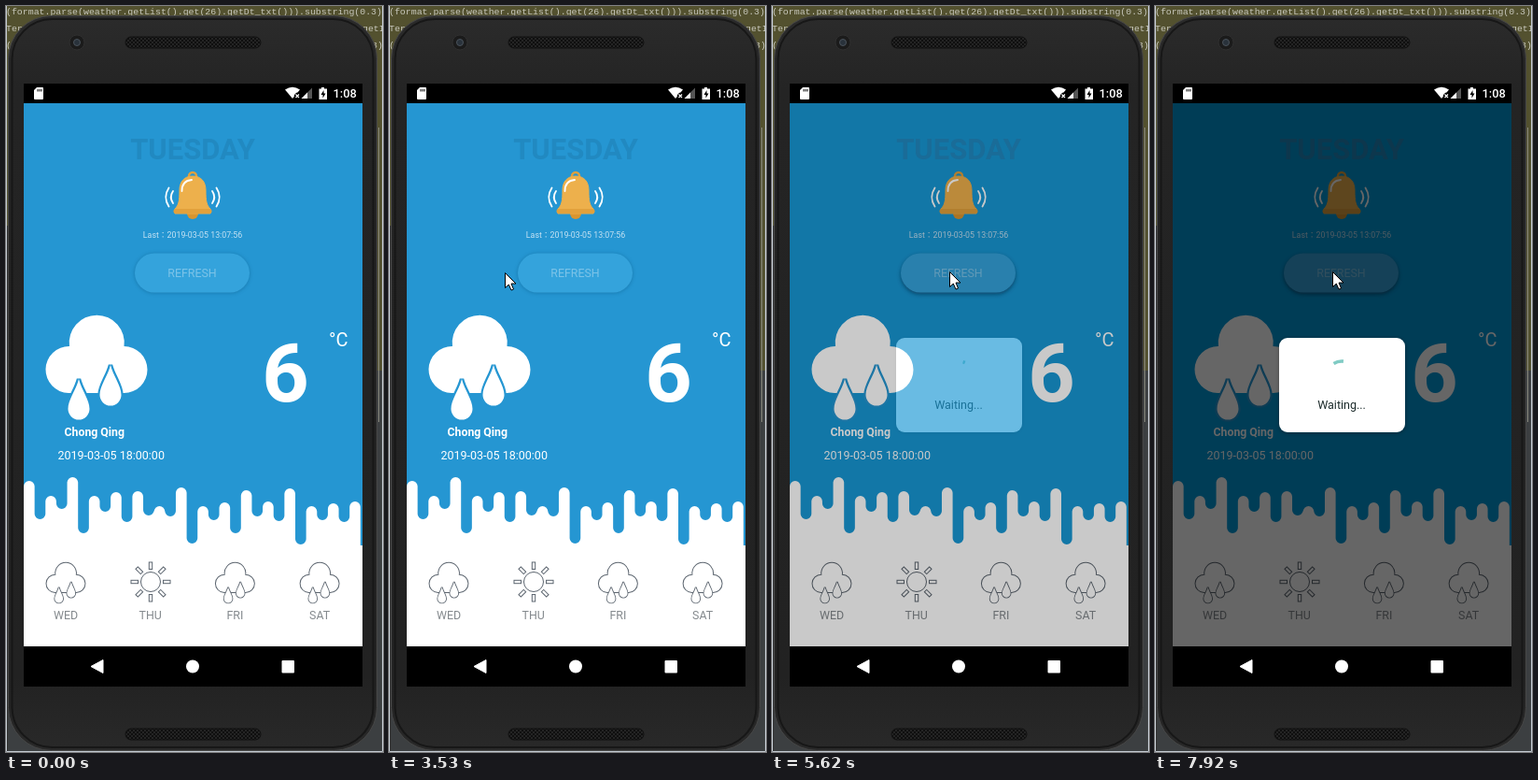
Animation of 404x798 px, one loop 8000 ms. Source, as an HTML page:

```html
<!DOCTYPE html>
<html lang="en">
<head>
<meta charset="utf-8">
<title>Weather refresh</title>
<style>
  html, body { margin: 0; width: 100%; height: 100%; overflow: hidden; background: #3c3f41; }
  svg { display: block; width: 404px; height: 798px; font-family: Roboto, sans-serif; }
  .code { font: 9.9px "Liberation Mono", monospace; fill: #c9c9bd; white-space: pre; }
  .mid { text-anchor: middle; }
  .bold { font-weight: 700; }
  .icon { fill: #fff; stroke: #5d6670; stroke-width: 2.6; --edge: #5d6670; }
  .big { fill: #fff; --edge: #2596d2; }
  .drop { stroke: var(--edge); stroke-width: 4.500; paint-order: stroke; }
</style>
</head>
<body>
<svg viewBox="0 0 404 798">
  <defs>
    <linearGradient id="shell" x2="0" y2="1">
      <stop offset="0" stop-color="#2b2b2b"/><stop offset=".1" stop-color="#242424"/>
      <stop offset=".9" stop-color="#222"/><stop offset="1" stop-color="#292929"/>
    </linearGradient>
    <pattern id="mesh" width="4" height="4" patternUnits="userSpaceOnUse">
      <rect width="4" height="4" fill="#242424"/>
      <circle cx="1" cy="1" r="1" fill="#080808"/><circle cx="3" cy="3" r="1" fill="#080808"/>
    </pattern>
    <filter id="soft" x="-20%" y="-30%" width="140%" height="180%"><feGaussianBlur stdDeviation="2"/></filter>
    <path id="drop" class="drop" d="M0 0C3 12 11.5 22 11.5 32A11.5 11.5 0 0 1-11.5 32C-11.5 22-3 12 0 0z"/>
    <g id="rain">
      <path d="M67 414a25 25 0 0 1 1-50a29.5 29.5 0 1 1 58.5 0a25 25 0 0 1 0 50z"/>
      <use href="#drop" x="78" y="399"/><use href="#drop" x="112" y="384"/>
    </g>
  </defs>

  <rect width="404" height="798" fill="#3c3f41"/>
  <path d="M0 0H404V390H0z" fill="#53512f"/>
  <path d="M0 235V798" stroke="#2b2b2b" stroke-width="4"/>
  <text class="code" y="9">(format.parse(weather.getList().get(26).getDt_txt())).substring(0.3)</text>
  <text class="code" y="27">Ter</text><text class="code" x="382" y="27">getI</text>
  <text class="code" y="45">(</text><text class="code" x="392" y="45">3)</text>
  <path d="M399.5 130V445" stroke="#8a8a80"/>
  <path d="M.5 0V797.500H403.500V0" fill="none" stroke="#c3cad2"/>

  <rect x="2.5" y="10.5" width="395" height="786" rx="46" fill="url(#shell)" stroke="#474747"/>
  <rect x="6.5" y="14" width="387" height="779" rx="43" fill="none" stroke="#171717" stroke-width="2"/>
  <g fill="url(#mesh)" stroke="#111">
    <rect x="128" y="33" width="145" height="12" rx="6"/>
    <rect x="128" y="773" width="145" height="12" rx="6"/>
  </g>
  <circle cx="76" cy="39" r="8" fill="#1b1b1b" stroke="#303030"/>
  <circle cx="76" cy="39" r="3.5" fill="#29323b" stroke="#4a525a"/>

  <rect x="19" y="83" width="363" height="645"/>
  <g fill="#fff">
    <path d="M33 87H39a1 1 0 0 1 1 1V99a1 1 0 0 1-1 1H31a1 1 0 0 1-1-1V90z"/>
    <path d="M34 89v2.5M36 89v2.5M38 89v2.5" stroke="#000"/>
    <path d="M299 89.5Q307 84 315 89.5L307 99z"/>
    <path d="M310 94l4 4m0-4l-4 4" stroke="#000" stroke-width="4"/>
    <path d="M310.5 94.5l3.5 3.5m0-3.5l-3.5 3.5" stroke="#fff" stroke-width="1.2"/>
    <path d="M328 87.500V99H316.500z" fill="#555"/><path d="M323 92.500V99H316.500z"/>
    <path d="M338 87h3v1.500h3V100h-8.500V88.500H338z"/>
    <path d="M340.500 90l-3 5h2v3.500l3-5h-2z" fill="#000"/>
    <text x="350.500" y="98" font-size="12.800" font-weight="500">1:08</text>
    <path d="M91 706.500L104 699.500V713.500z" stroke="#fff" stroke-linejoin="round"/>
    <circle cx="200" cy="706.500" r="7"/>
    <rect x="295.500" y="700" width="13.500" height="13.500" rx="1"/>
  </g>

  <rect id="sky" x="19" y="104" width="363" height="581"/>
  <path id="wave" fill="#fff"/>
  <text class="mid bold" x="200" y="164" font-size="31" fill="#2189c1">TUESDAY</text>

  <circle cx="200" cy="222" r="6" fill="#d9952f"/>
  <circle cx="200" cy="182" r="4" fill="none" stroke="#e0a03c" stroke-width="2.500"/>
  <path d="M200 182C190 182 186 189 186 197C186 209 185 213 181 217V222H219V217C215 213 214 209 214 197C214 189 210 182 200 182z" fill="#edb04c" stroke="#edb04c"/>
  <path d="M182 219.500H218" stroke="#e2a13c" stroke-width="5" stroke-linecap="round"/>
  <g fill="none" stroke="#fff" stroke-linecap="round" stroke-width="1.800">
    <path d="M188.500 198C188.500 190 192 186.500 199 186"/>
    <path d="M179 198Q174.500 204.500 179 211M174.500 194.500Q168 204.500 174.500 214.500"/>
    <path d="M221 198Q225.500 204.500 221 211M225.500 194.500Q232 204.500 225.500 214.500"/>
  </g>
  <text class="mid" x="200" y="248" font-size="8.800" fill="#c5e2f3">Last：2019-03-05 13:07:56</text>

  <rect id="shadow" x="138" y="266" width="123" height="42" rx="21" fill="#0b4b75" filter="url(#soft)"/>
  <rect x="138" y="264.500" width="123" height="42" rx="21" fill="#34a3dc"/>
  <text class="mid" x="199.500" y="290" font-size="12.400" fill="#7cc3e8">REFRESH</text>

  <use href="#rain" class="big"/>
  <g fill="#fff">
    <text class="bold" x="62.500" y="460" font-size="12.300">Chong Qing</text>
    <text x="55.500" y="485" font-size="12.500">2019-03-05 18:00:00</text>
    <text class="mid bold" x="299.500" y="423" font-size="88">6</text>
    <text x="346" y="364" font-size="20">°C</text>
  </g>
  <g id="forecast"></g>

  <g id="dialog">
    <rect x="19" y="104" width="363" height="581" opacity=".6"/>
    <rect x="133" y="356" width="135" height="101" rx="9" opacity=".3" filter="url(#soft)"/>
    <rect x="133" y="355" width="135" height="101" rx="9" fill="#fff"/>
    <circle id="spinner" cx="200" cy="396" r="16" fill="none" stroke="#80cbc4" stroke-width="3.600" pathLength="360"/>
    <text class="mid" x="200" y="431" font-size="12.500" fill="#1c2b2b">Waiting...</text>
  </g>
  <path id="cursor" d="M.5.5V16.500L4.300 13L7 19L9.500 18L7 12H12z" fill="#fff" stroke="#000" stroke-linejoin="round"/>
</svg>
<script>
const $ = id => document.getElementById(id);
const clamp = v => Math.max(0, Math.min(1, v));
const LOOP = 8000, TICK = 77;

// Alternating bar tops and gap bottoms, joined by half circles.
const tops = [508, 524, 504, 524, 520, 519, 535, 515, 535, 531, 518, 530, 516, 535, 532, 530];
const gaps = [549, 538, 564, 541, 552, 545, 546, 575, 550, 564, 546, 551, 576, 550, 552];
const barWidth = 11.64, r = barWidth / 2;
let wave = 'M19 685';
tops.forEach((top, i) => {
  wave += `V${top + r}a${r} ${r} 0 0 1 ${barWidth} 0`;
  if (i < gaps.length) wave += `V${gaps[i] - r}a${r} ${r} 0 0 0 ${barWidth} 0`;
});
$('wave').setAttribute('d', wave + 'V577H382V685z');

const rays = [...Array(8).keys()].map(i =>
  `<rect x="-1.700" y="-21" width="3.400" height="7.500" transform="rotate(${i * 45})"/>`).join('');
const sun = `<g transform="translate(155 616)" class="icon" style="stroke-width:1"><circle r="10.500"/>${rays}</g>`;
const cloud = x => `<use href="#rain" class="icon" transform="translate(${x} 595.5) scale(.385) translate(-97 -331)"/>`;
$('forecast').innerHTML = ['WED', 'THU', 'FRI', 'SAT'].map((day, i) => {
  const x = 64 + i * 90.700;
  return (i === 1 ? sun : cloud(x)) +
    `<text class="mid" x="${x}" y="656" font-size="12.400" fill="#858a8e">${day}</text>`;
}).join('');

// Pointer route: time, x, y
const route = [
  [760, 106, 784], [1060, 205, 742], [1453, 327, 659], [1530, 356, 594],
  [1700, 365, 500], [1915, 320, 387], [1992, 320, 387], [2150, 250, 240],
  [2300, 120, 125], [2450, 40, 250], [2620, 200, 440], [2839, 344, 545],
  [2916, 344, 563], [3150, 260, 470], [3400, 110, 330], [3609, 132, 258],
  [3763, 132, 258], [4050, 205, 252], [4302, 271, 240], [4610, 190, 284], [LOOP, 190, 284]
];

function pointerAt(t) {
  const i = Math.max(1, route.findIndex(p => p[0] >= t));
  const [t0, x0, y0] = route[i - 1], [t1, x1, y1] = route[i];
  const f = clamp((t - t0) / (t1 - t0));
  return [x0 + (x1 - x0) * f, y0 + (y1 - y0) * f].map(Math.round);
}

// cubic-bezier(.4, 0, .2, 1)
function ease(x) {
  x = clamp(x);
  let lo = 0, hi = 1;
  for (let i = 0; i < 20; i++) {
    const u = (lo + hi) / 2, v = 1 - u;
    if (1.2 * v * v * u + .6 * v * u * u + u ** 3 < x) lo = u; else hi = u;
  }
  return lo * lo * (3 - 2 * lo);
}

function drawSpinner(ms) {
  const p = ms % 1333 / 1333;
  const tail = 270 * ease(2 * p - 1), head = 270 * ease(2 * p);
  const turn = tail + 90 * p + 720 * ms / 4444 - 90;
  $('spinner').setAttribute('stroke-dasharray', `${head - tail} 360`);
  $('spinner').setAttribute('transform', `rotate(${turn} 200 396)`);
}

function draw(now) {
  const time = now % LOOP;
  const t = 760 + Math.floor((time - 752) / TICK) * TICK;
  const [x, y] = pointerAt(t);
  $('cursor').setAttribute('transform', `translate(${x} ${y})`);
  $('cursor').style.display = t < 760 ? 'none' : '';
  const press = t < 5050 ? 0 : clamp((t - 4980) / 220);
  $('shadow').setAttribute('opacity', .4 + .4 * press);
  $('shadow').setAttribute('y', 265 + 1.5 * press);
  const dim = clamp((t - 5534) / 220);
  $('dialog').setAttribute('opacity', dim);
  // The sky loses its red as it darkens.
  $('sky').setAttribute('fill', `rgb(${37 * (1 - dim)}, ${150 + 2 * dim}, ${210 + 6 * dim})`);
  drawSpinner(Math.max(0, t - 5538));
  requestAnimationFrame(() => draw(performance.now() - start));
}
const start = performance.now();
draw(0);
</script>
</body>
</html>
```
